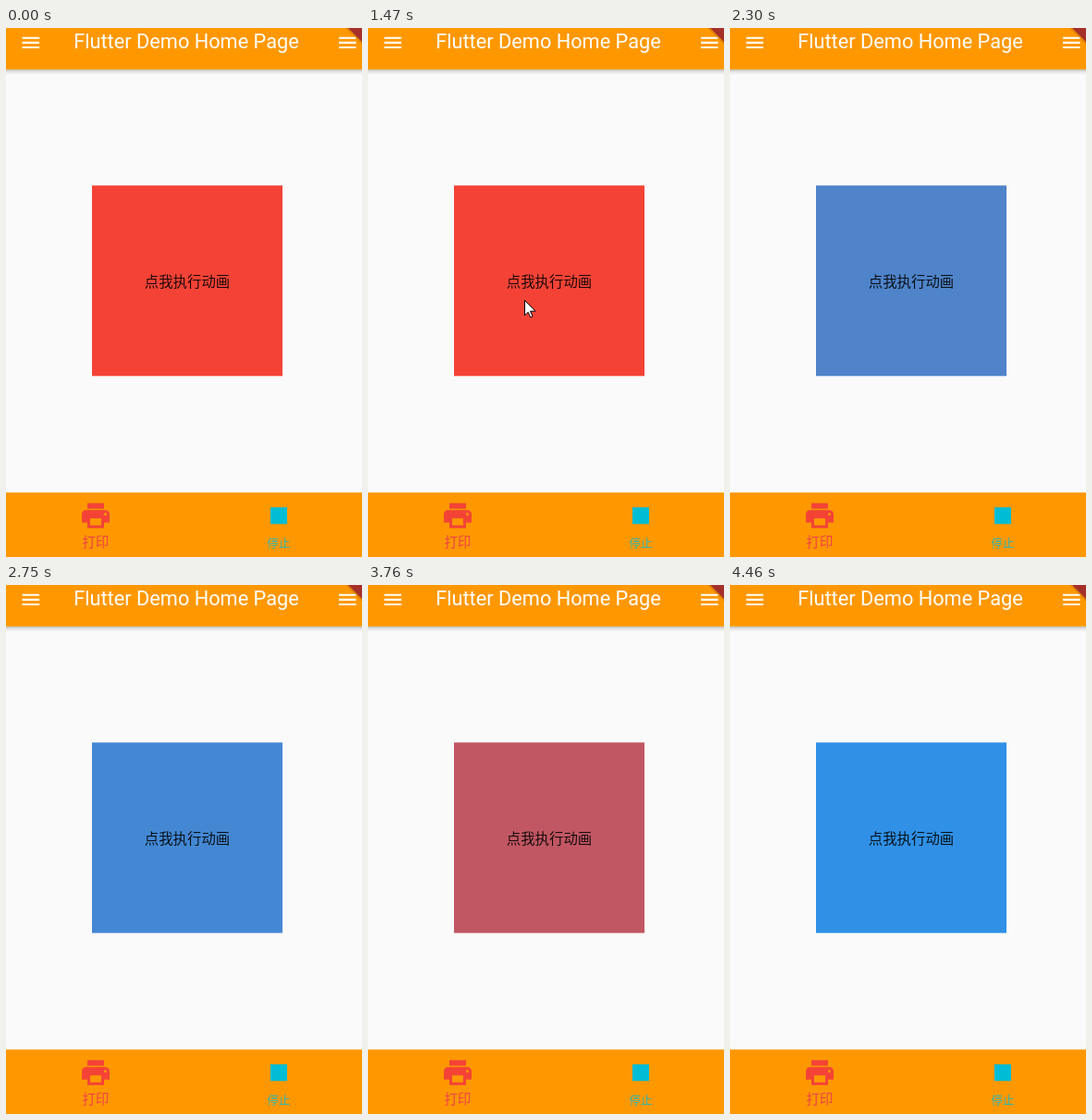
These frames come from a looping animation (385x572 px, 4530 ms). An HTML page:

```html
<!DOCTYPE html>
<html lang="zh-CN">
<head>
<meta charset="utf-8">
<title>Flutter Demo</title>
<style>
  html, body { margin: 0; width: 100%; height: 100%; overflow: hidden; background: #fafafa; }
  svg { display: block; width: 385px; height: 572px; }
  .title { font: 400 21.75px Roboto, sans-serif; fill: #fff; }
  .cjk { font-family: "Noto Sans CJK SC", "Noto Sans CJK", sans-serif; text-anchor: middle; }
</style>
</head>
<body>
<svg viewBox="0 0 385 572" xmlns="http://www.w3.org/2000/svg">
  <defs>
    <linearGradient id="shade" x2="0" y2="1">
      <stop offset="0" stop-opacity=".25"/>
      <stop offset=".4" stop-opacity=".09"/>
      <stop offset="1" stop-opacity="0"/>
    </linearGradient>
    <path id="menu" d="M0 0h18.5v2.1H0zM0 5.15h18.5v2.1H0zM0 10.3h18.5v2.1H0z" fill="#fff"/>
  </defs>
  <rect width="385" height="572" fill="#fafafa"/>

  <rect y="44.8" width="385" height="6" fill="url(#shade)"/>
  <rect width="385" height="44.8" fill="#ff9800"/>
  <use href="#menu" x="17.6" y="9.7"/>
  <use href="#menu" x="360" y="9.7"/>
  <text class="title" x="73.2" y="22">Flutter Demo Home Page</text>
  <path d="M367 0h18v18z" opacity=".12"/>
  <path d="M370 0h15v15z" fill="#a5302a"/>

  <rect id="box" x="93" y="170.3" width="206" height="206" fill="#f44336"/>
  <text class="cjk" x="196" y="280" font-size="15.4" fill-opacity=".87">点我执行动画</text>

  <rect y="502.3" width="385" height="70" fill="#ff9800"/>
  <path transform="translate(79 509.3) scale(1.5)" fill="#f44336" d="M19 8H5c-1.66 0-3 1.34-3 3v6h4v4h12v-4h4v-6c0-1.66-1.34-3-3-3zm-3 11H8v-5h8v5zm3-7c-.55 0-1-.45-1-1s.45-1 1-1 1 .45 1 1-.45 1-1 1zm-1-9H6v4h12V3z"/>
  <text class="cjk" x="97" y="561" font-size="14.4" fill="#f0404a">打印</text>
  <rect x="286" y="518.3" width="18" height="18" fill="#00bcd4"/>
  <text class="cjk" x="295" y="561.8" font-size="12.4" fill="#00bcd4" fill-opacity=".85">停止</text>

  <path id="cursor" d="M.5 .5V16.8L4.2 13.3 6.8 18.8 9 17.8 6.6 12.2H12z" fill="#fff" stroke="#000" stroke-linejoin="round"/>
</svg>
<script>
const LOOP = 4530;
const STEP = LOOP / 59;   // screen refresh interval
const LEAD = 10;          // refreshes show slightly early
const TAP = 1522;         // the colour tween starts here
const SWING = 1000;       // time from red to blue
const RED = [244, 67, 54], BLUE = [33, 150, 243];

// pointer stops: time, x, y
const path = [[380, 372, 460], [600, 88, 340], [770, 138, 320], [1070, 180, 305],
  [1300, 180, 305], [1470, 168, 293], [1540, 168, 293], [1766, 189, 324], [2160, 374, 464]];

const box = document.getElementById("box");
const cursor = document.getElementById("cursor");

function tint(t) {
  const swing = Math.max(0, t - TAP) / SWING % 2;
  const k = 1 - Math.abs(1 - swing);
  return `rgb(${RED.map((c, i) => Math.round(c + (BLUE[i] - c) * k))})`;
}

// place on the pointer path, or null while it is off the stage
function pointer(t) {
  const i = path.findIndex(p => p[0] > t);
  if (i < 1) return null;
  const [t0, x0, y0] = path[i - 1], [t1, x1, y1] = path[i];
  const k = (t - t0) / (t1 - t0);
  return [x0 + (x1 - x0) * k, y0 + (y1 - y0) * k].map(Math.round);
}

function draw(now) {
  const t = Math.floor((now % LOOP + LEAD) / STEP) % 59 * STEP;
  const spot = pointer(t);
  box.setAttribute("fill", tint(t));
  cursor.setAttribute("visibility", spot ? "visible" : "hidden");
  if (spot) cursor.setAttribute("transform", `translate(${spot})`);
}

const began = performance.now();
function frame() {
  draw(performance.now() - began);
  requestAnimationFrame(frame);
}
frame();
</script>
</body>
</html>
```
